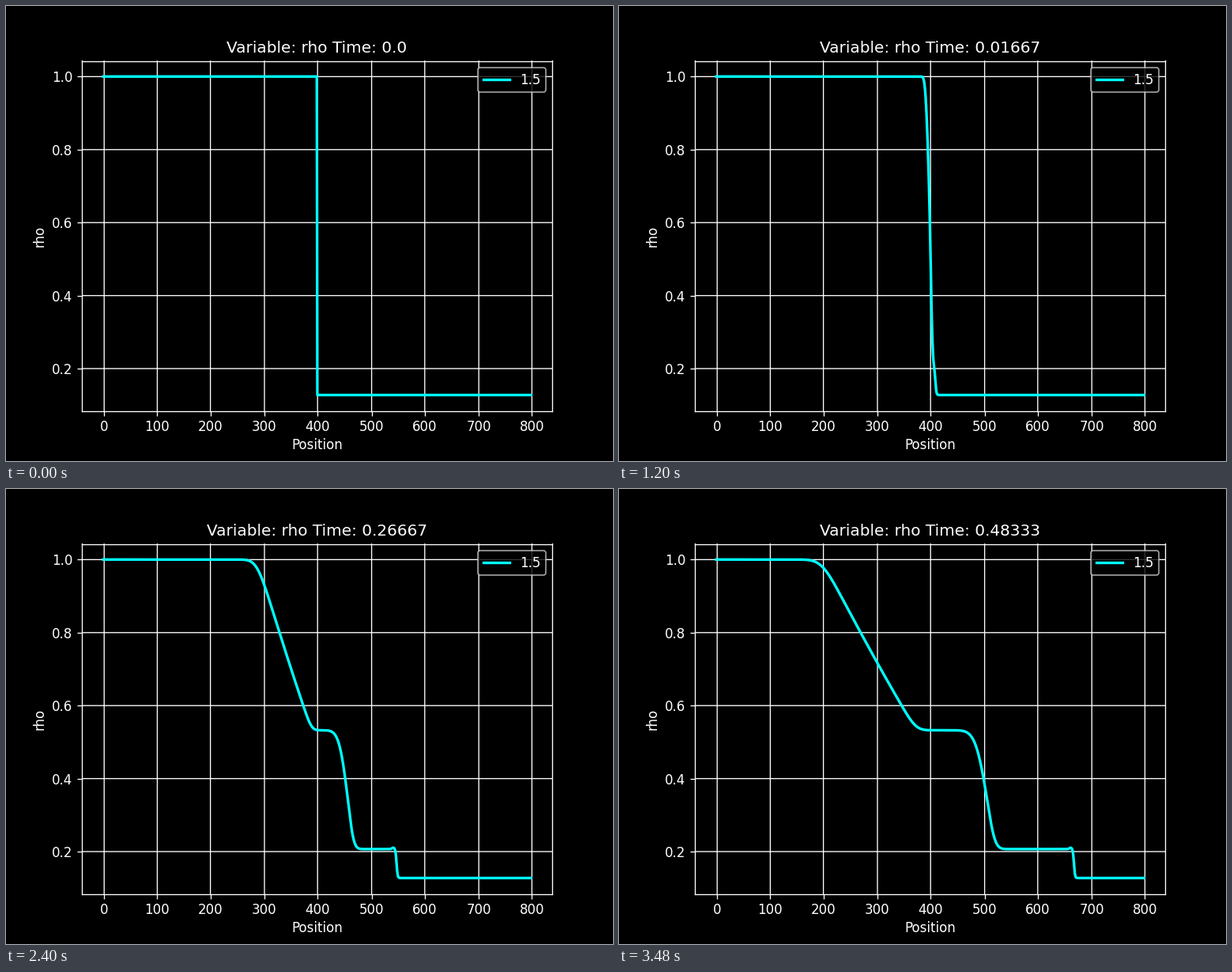
A matplotlib script that plays this animation: 768x576 px, repeating every 3600 ms.

```python
import math

import numpy as np
import matplotlib.pyplot as plt
from matplotlib.animation import FuncAnimation

plt.style.use("dark_background")

# Density levels: left state, rarefied plateau, shocked plateau, right state
LEFT, PLATEAU, SHOCKED, RIGHT = 1.0, 0.531, 0.2045, 0.125
FAN_POWER = 1.3
STEPS = 30
MIDDLE = 400
PIXEL = 1.2  # the ruling sits on a pixel grid this coarse
cells = np.arange(800)
erf = np.vectorize(math.erf)


def norm_cdf(z):
    return 0.5 * (1 + erf(z / math.sqrt(2)))


def soft_ramp(x, sigma):
    """max(x, 0) with its corner rounded by a Gaussian."""
    z = x / sigma
    bell = np.exp(-z * z / 2) / math.sqrt(2 * math.pi)
    return sigma * (z * norm_cdf(z) + bell)


def skew_step(x, left, right):
    """Smooth 0-to-1 step with a different spread on each side."""
    p = norm_cdf(np.where(x < 0, x / left, x / right))
    low = 2 * left * p
    high = left + right * (2 * p - 1)
    return np.where(x < 0, low, high) / (left + right)


def density(t):
    """Smeared shock tube: rarefaction fan, contact and shock."""
    if t == 0:
        return np.where(cells < MIDDLE, LEFT, RIGHT)
    x = cells - MIDDLE
    root = math.sqrt(t)

    # Density is a power of a ramp that falls linearly across the fan
    head = -415 * t - 2
    tail = 30 * root - 98 * t
    slope = (1 - PLATEAU ** (1 / FAN_POWER)) / (tail - head)
    fan = soft_ramp(x - head, 24 * root) - soft_ramp(x - tail, 24 * t)
    rho = (1 - slope * fan) ** FAN_POWER

    contact = x - (236 * t - 9 * root)
    rho -= (PLATEAU - SHOCKED) * skew_step(contact, 26 * root, 15 * root)

    shock = x - 555 * t
    rho -= (SHOCKED - RIGHT) * 0.5 * (1 + np.tanh(shock / 2))
    return rho + 0.004 * np.exp(-((shock + 6) / 3.5) ** 2)


def coarse(v):
    return PIXEL * (np.floor(v / PIXEL + 0.5) + 0.5)


def rule(ax, xs, ys):
    """Put ticks and grid lines on the centres of coarse pixels."""
    height = ax.figure.bbox.height
    to_px, to_data = ax.transData, ax.transData.inverted()
    px = to_px.transform([(x, 0) for x in xs])[:, 0]
    py = height - to_px.transform([(0, y) for y in ys])[:, 1]
    gx = to_data.transform([(p, 0) for p in coarse(px)])[:, 0]
    gy = to_data.transform([(0, height - p) for p in coarse(py)])[:, 1]
    ax.set_xticks(gx, [str(x) for x in xs])
    ax.set_yticks(gy, [f"{y:.1f}" for y in ys])
    ax.grid(True, snap=False)


# Snapshots play in order of label length first, then of time
times = [round(i / 60, 5) for i in range(STEPS)]
times.sort(key=lambda t: (len(str(t)), t))

fig, ax = plt.subplots(figsize=(6.4, 4.8), dpi=120)
line, = ax.plot(cells, density(0), color="cyan", linewidth=2, label="1.5")
ax.set_xlim(-39.95, 838.95)
ax.set_ylim(0.08125, 1.04375)
ax.spines["top"].set_position(("outward", -0.4))
rule(ax, range(0, 801, 100), np.arange(1, 6) / 5)
ax.set_xlabel("Position", labelpad=2.8)
ax.set_ylabel("rho")
ax.legend(loc="upper right", bbox_to_anchor=(1.001, 0.9985))
title = ax.set_title("Variable: rho Time: 0.0")


def update(i):
    t = times[i]
    line.set_ydata(density(t))
    title.set_text(f"Variable: rho Time: {t}")
    return line, title


anim = FuncAnimation(fig, update, frames=STEPS, interval=120,
                     repeat=True, repeat_delay=0)
plt.show()
```
